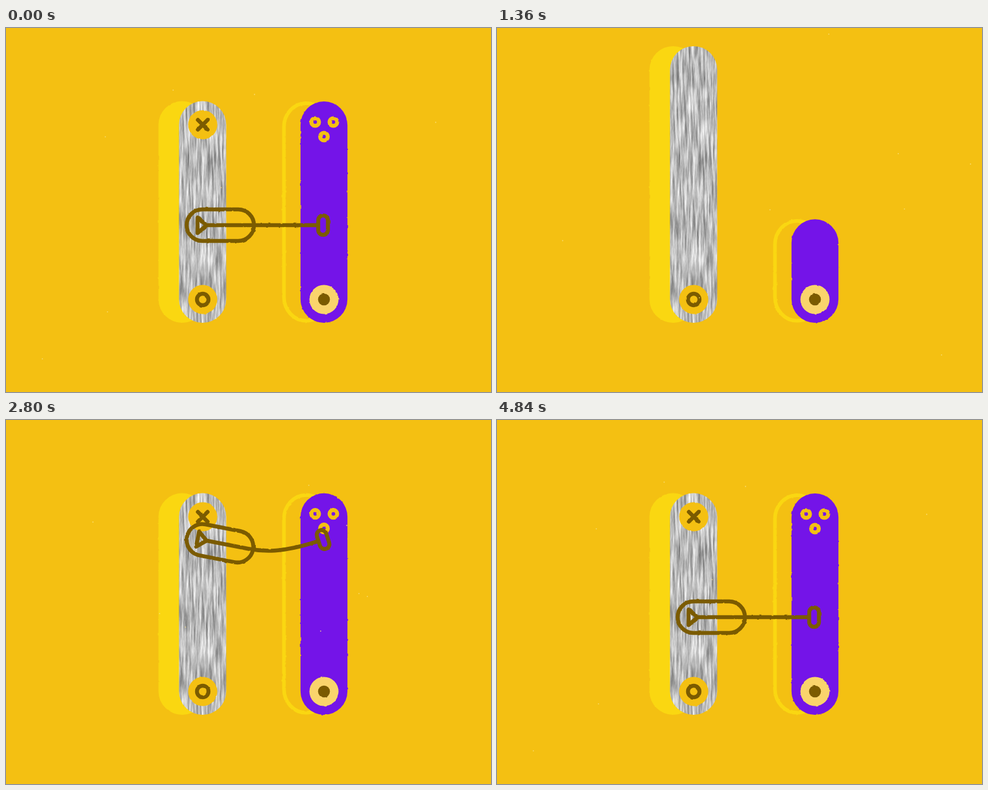
An HTML page that plays this animation: 800x600 px, repeating every 4880 ms.

```html
<!DOCTYPE html>
<html lang="en">
<head>
<meta charset="utf-8">
<title>Letter H</title>
<style>
  html, body { margin: 0; width: 100%; height: 100%; overflow: hidden; background: #f4c012; }
  svg { display: block; width: 800px; height: 600px; }
  .line { fill: none; stroke: #7b5b00; stroke-width: 6.5; stroke-linecap: round; stroke-linejoin: round; }
  .sun { fill: #f4c012; }
  .glow { fill: #fad711; }
  .eyes circle { fill: none; stroke: #f4c012; stroke-width: 6.6; }
</style>
</head>
<body>
<svg viewBox="0 0 800 600">
  <defs>
    <filter id="rough" filterUnits="userSpaceOnUse" x="0" y="0" width="800" height="600" color-interpolation-filters="sRGB">
      <feTurbulence id="noise" type="fractalNoise" baseFrequency=".12" numOctaves="2" seed="1"/>
      <feColorMatrix values="1 0 0 0 0  0 1 0 0 0  0 0 1 0 0  0 0 0 0 1" result="n"/>
      <feDisplacementMap in="SourceGraphic" in2="n" scale="2.2" xChannelSelector="R" yChannelSelector="G"/>
    </filter>
    <filter id="wood" x="0" y="0" width="1" height="1" color-interpolation-filters="sRGB">
      <feTurbulence type="fractalNoise" baseFrequency=".3 .02" numOctaves="5" seed="7"/>
      <feColorMatrix values=".8 0 0 0 .33  .8 0 0 0 .33  .8 0 0 0 .33  0 0 0 0 1"/>
    </filter>
    <clipPath id="plank"><rect id="leftBar"/></clipPath>
  </defs>

  <rect class="sun" width="800" height="600"/>

  <g filter="url(#rough)">
    <g id="popGlow"><rect id="leftGlow" class="glow"/></g>
    <g id="popRim"><rect id="rightRim" fill="none" stroke="#fad711" stroke-width="6"/></g>
  </g>

  <g id="popWood">
    <g clip-path="url(#plank)">
      <rect x="270" y="25" width="110" height="470" filter="url(#wood)"/>
      <rect x="135" y="-20" width="55" height="45" transform="scale(2 1)" filter="url(#wood)"/>
    </g>
  </g>

  <g filter="url(#rough)">
    <g id="leftFoot">
      <circle class="sun" r="24"/>
      <circle class="line" r="9.5"/>
    </g>
    <g id="leftHead">
      <circle class="sun" r="24"/>
      <path class="line" d="M-8-8 8 8M8-8-8 8"/>
    </g>
    <g id="popRight">
      <rect id="rightBar" fill="#7414e8"/>
      <circle cx="524.5" cy="447.5" r="24" fill="#fad46c"/>
      <circle cx="524.5" cy="447.5" r="9.8" fill="#7b5b00"/>
    </g>
    <g id="eyes" class="eyes">
      <circle cx="-14.5" cy="-8" r="6.3"/>
      <circle cx="15.5" cy="-8" r="6.3"/>
      <circle cy="16" r="6.3"/>
    </g>
    <g id="rope">
      <path id="cord" class="line"/>
      <g id="grip" class="line">
        <rect x="-23" y="-26" width="111" height="52" rx="26"/>
        <path d="M-5-12.5V13L10 0Z"/>
      </g>
      <rect id="pad" class="line" x="-8" y="-16" width="16" height="32" rx="8"/>
    </g>
  </g>

  <path id="dust" fill="none" stroke="#fbe48a" stroke-width="1.8" stroke-linecap="round" opacity=".8"/>
</svg>

<script>
const LOOP = 4880, STEP = 40, FLOOR = 486, SHEETS = 5;
const $ = id => document.getElementById(id);
const set = (id, attrs) => { for (const k in attrs) $(id).setAttribute(k, attrs[k]); };
const move = (id, transform) => set(id, { transform });

const part = (t, from, to) => Math.min(1, Math.max(0, (t - from) / (to - from)));
const ease = (t, from, to) => {
  const u = part(t, from, to);
  return u * u * (3 - 2 * u);
};
const wobble = (t, from, period) => {
  const u = Math.max(0, t - from) / period;
  return Math.exp(-2.4 * u) * Math.sin(2 * Math.PI * u);
};

function random(seed) {
  return () => (seed = seed * 16807 % 2147483647) / 2147483647;
}

function dust(sheet) {
  const rnd = random(9001 + sheet * 7919);
  let d = "";
  for (let i = 0; i < 8; i++) d += `M${5 + rnd() * 780} ${8 + rnd() * 553}h.1`;
  return d;
}

function bar(id, cx, top, bottom, half) {
  set(id, { x: cx - half, y: top, width: half * 2, height: bottom - top, rx: half, ry: 39 });
}

const scaleAt = (x, y, s) => `translate(${x} ${y}) scale(${s}) translate(${-x} ${-y})`;
const ray = ([x, y], deg, d) => {
  const a = deg * Math.PI / 180;
  return [x + d * Math.cos(a), y + d * Math.sin(a)];
};

function drawBars(t) {
  const pop = ease(t, 40, 200);
  const squash = ease(t, 960, 1080) - ease(t, 1080, 1240);
  const wide = 1 + .29 * squash;
  const top = 408 + 12 * squash - 560 * ease(t, 1100, 1520)
    + 272.5 * ease(t, 1720, 1960) + 12 * wobble(t, 1960, 280);
  bar("leftGlow", 290.5, top, FLOOR, 39 * wide);
  bar("leftBar", 324.3, top, FLOOR, 39 * wide);
  move("popGlow", scaleAt(290.5, 447, pop));
  move("popWood", scaleAt(324.3, 447, pop));
  move("leftFoot", `translate(324.5 447.5) scale(${pop * (1 + .5 * squash)} ${pop})`);
  move("leftHead", `translate(324.5 ${top + 39}) scale(${ease(t, 1960, 2120)})`);

  const crown = 408 - 318 * ease(t, 1160, 1720) + 31 * ease(t, 1720, 2000) + 21 * wobble(t, 2140, 400);
  const lift = 5 - 5 * ease(t, 1160, 1400);
  bar("rightBar", 524.5, crown, FLOOR, 38.7);
  bar("rightRim", 495, crown - lift + 3, FLOOR - 3.5, 36.5);
  move("popRight", scaleAt(524.5, 447, pop));
  move("popRim", scaleAt(495, 447, pop));
  move("eyes", `translate(524.5 ${crown + 42}) scale(${ease(t, 1900, 2080)})`);
}

// The rope falls in, leaps while swapping ends, then drops into the crossbar.
function drawRope(t) {
  const enter = ease(t, 1840, 2200), flip = ease(t, 2240, 2800), drop = ease(t, 2800, 3000);
  const leap = Math.sin(Math.PI * part(t, 2240, 2800));
  const settle = wobble(t, 3000, 320);
  const mid = [420.5 + 1.5 * flip, 490 * enter - 163 - 130 * flip - 150 * leap + 128 * drop + 18 * settle];
  const half = 76.5 + 24.5 * flip;
  const turn = 180 * (1 - flip);
  const gripDir = 128 - 117 * flip - 11 * drop - 9 * settle;
  const padDir = 75 - 273 * flip + 18 * drop + 9 * settle;
  const a = ray(mid, turn, -half), b = ray(mid, turn, half);
  const curve = [ray(a, gripDir, 105), ray(b, padDir, 72), ray(b, padDir, 10)];
  set("rope", { visibility: enter ? "visible" : "hidden" });
  set("cord", { d: `M${ray(a, gripDir, 12)}L${ray(a, gripDir, 80)}C${curve.join(" ")}` });
  move("grip", `translate(${a}) rotate(${gripDir})`);
  move("pad", `translate(${b}) rotate(${padDir})`);
}

let last = -1;
function draw(now) {
  const tick = Math.floor(now % LOOP / STEP);
  if (tick === last) return;
  last = tick;
  // The loop opens on the finished letter, then cuts to the empty stage.
  const t = tick ? tick * STEP : LOOP;
  const sheet = tick ? Math.floor((tick - 1) / 2) % SHEETS : 0;
  set("noise", { seed: sheet + 1 });
  set("dust", { d: dust(sheet) });
  drawBars(t);
  drawRope(t);
}

const start = performance.now();
function loop() {
  draw(performance.now() - start);
  requestAnimationFrame(loop);
}
loop();
</script>
</body>
</html>
```
